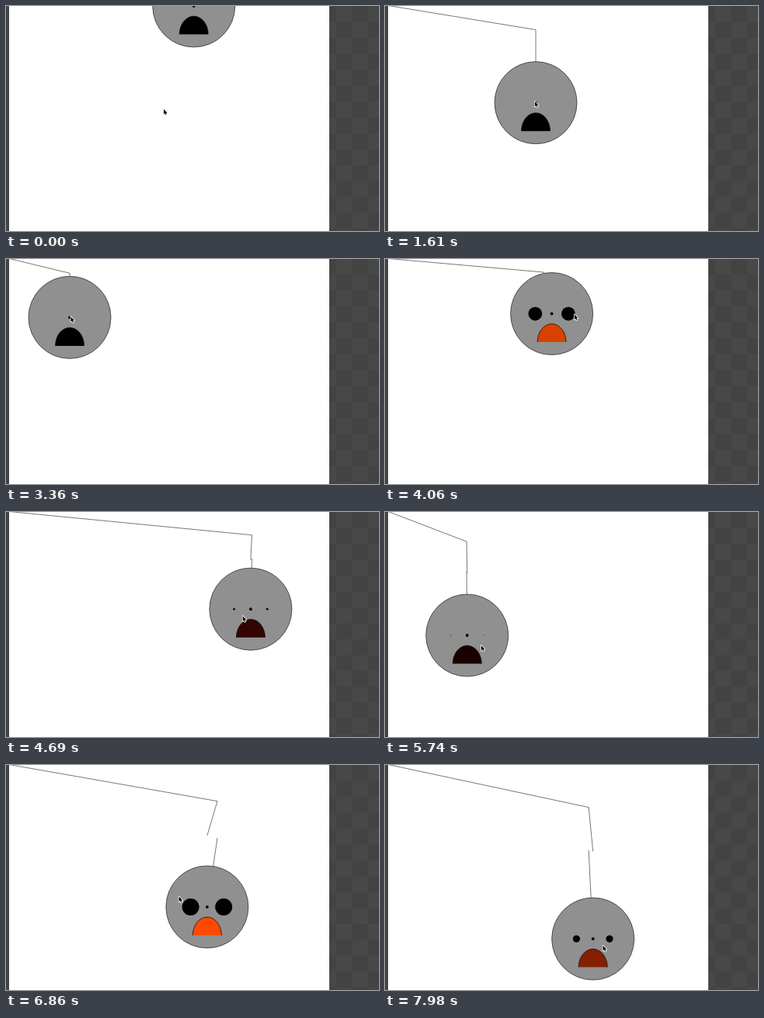
Recreate the animation shown at these times as an HTML page with a canvas. Size 480 by 290 pixels, loop 8 s.

```html
<!DOCTYPE html>
<html lang="en">
<head>
<meta charset="utf-8">
<title>Face on a string</title>
<style>
  html, body { margin: 0; width: 100%; height: 100%; overflow: hidden; background: #444; }
  canvas { display: block; }
</style>
</head>
<body>
<canvas id="stage" width="480" height="290"></canvas>
<script>
const ctx = document.getElementById('stage').getContext('2d');
const LOOP = 8000, TICK = 70, START = 1540, STEP = 35, LEAD = 100;
const LEFT = 4, RIGHT = 416;

// Turning points [time, position]; each sweep between two is half a cosine wave
const turnsX = [
  [1610, 194], [3150, 82], [3400, 82], [4620, 317],
  [5716, 105], [6430, 364], [7260, 165], [8257, 290]
];
const turnsY = [
  [START, 125], [2850, 78], [4100, 70.5], [4950, 140],
  [5294, 128], [6500, 231], [7053, 165], [8657, 260]
];

function sweep(turns, t) {
  const i = turns.findIndex(turn => turn[0] > t);
  if (i === 0) return turns[0][1];
  const [t0, a] = turns[i - 1], [t1, b] = turns[i];
  return a + (b - a) * (1 - Math.cos(Math.PI * (t - t0) / (t1 - t0))) / 2;
}

const placeAt = t => ({ x: sweep(turnsX, t), y: sweep(turnsY, t) });

function line(x0, y0, x1, y1) {
  ctx.beginPath();
  ctx.moveTo(x0, y0);
  ctx.lineTo(x1, y1);
  ctx.stroke();
}

function disc(x, y, r, color) {
  ctx.fillStyle = color;
  ctx.beginPath();
  ctx.arc(x, y, r, 0, Math.PI * 2);
  ctx.fill();
}

function drawBackdrop() {
  const cell = 20.5;
  ctx.fillStyle = '#434343';
  ctx.fillRect(0, 0, 480, 290);
  ctx.fillStyle = '#484848';
  for (let row = 0; row < 15; row++) {
    for (let col = -1; col < 3; col++) {
      if ((row + col) % 2 === 0) ctx.fillRect(425 + col * cell, row * cell, cell, cell);
    }
  }
  ctx.fillStyle = '#fff';
  ctx.fillRect(LEFT, 0, RIGHT - LEFT, 290);
}

// The string hangs between where the face is and where it just was
function drawString(now, was) {
  const lift = -0.6;
  ctx.strokeStyle = '#555';
  ctx.lineWidth = 0.8;
  line(LEFT, lift, was.x, was.y / 4 + lift);
  line(was.x, was.y / 4 + lift, now.x, now.y / 2 + lift);
  line(was.x, was.y / 2 + lift, now.x, now.y);
}

// Sideways speed widens the eyes and heats up the mouth
function drawFace({ x, y }, shock) {
  disc(x, y, 53, '#909090');
  ctx.strokeStyle = '#333';
  ctx.lineWidth = 0.8;
  ctx.stroke();

  disc(x, y, 1.9, '#000');
  if (shock > 0) {
    disc(x - 21.3, y, shock, '#000');
    disc(x + 21.3, y, shock, '#000');
  }

  const red = Math.min(255, 42 * shock ** 0.75);
  const green = Math.min(74, Math.max(0, 8 * shock - 6));
  ctx.fillStyle = `rgb(${Math.round(red)}, ${Math.round(green)}, 0)`;
  ctx.beginPath();
  ctx.ellipse(x, y + 36.6, 18.5, 23.5, 0, Math.PI, Math.PI * 2);
  ctx.fill();
  ctx.strokeStyle = '#111';
  ctx.stroke();
}

function drawPointer({ x, y }) {
  const shape = [[0, 0], [0, 6.6], [1.5, 5.3], [2.5, 7.6], [3.6, 7.1], [2.6, 4.9], [4.6, 4.8]];
  ctx.beginPath();
  shape.forEach(([dx, dy]) => ctx.lineTo(x + dx, y + dy));
  ctx.closePath();
  ctx.lineJoin = 'round';
  ctx.strokeStyle = '#fff';
  ctx.lineWidth = 1.6;
  ctx.stroke();
  ctx.fillStyle = '#000';
  ctx.fill();
}

function draw(t) {
  drawBackdrop();
  ctx.save();
  ctx.beginPath();
  ctx.rect(LEFT, 0, RIGHT - LEFT, 290);
  ctx.clip();
  if (t < START) {
    drawFace({ x: 241.7, y: 0 }, 0);
    drawPointer({ x: 203, y: 133 });
  } else {
    const now = placeAt(t), was = placeAt(t - STEP);
    drawString(now, was);
    drawFace(now, Math.min(11, 0.84 * Math.abs(now.x - was.x)));
    drawPointer(placeAt(t + LEAD));
  }
  ctx.restore();
}

const begin = performance.now();
function tick() {
  const t = (performance.now() - begin) % LOOP;
  draw(Math.floor(t / TICK) * TICK);
  requestAnimationFrame(tick);
}
tick();
</script>
</body>
</html>
```
